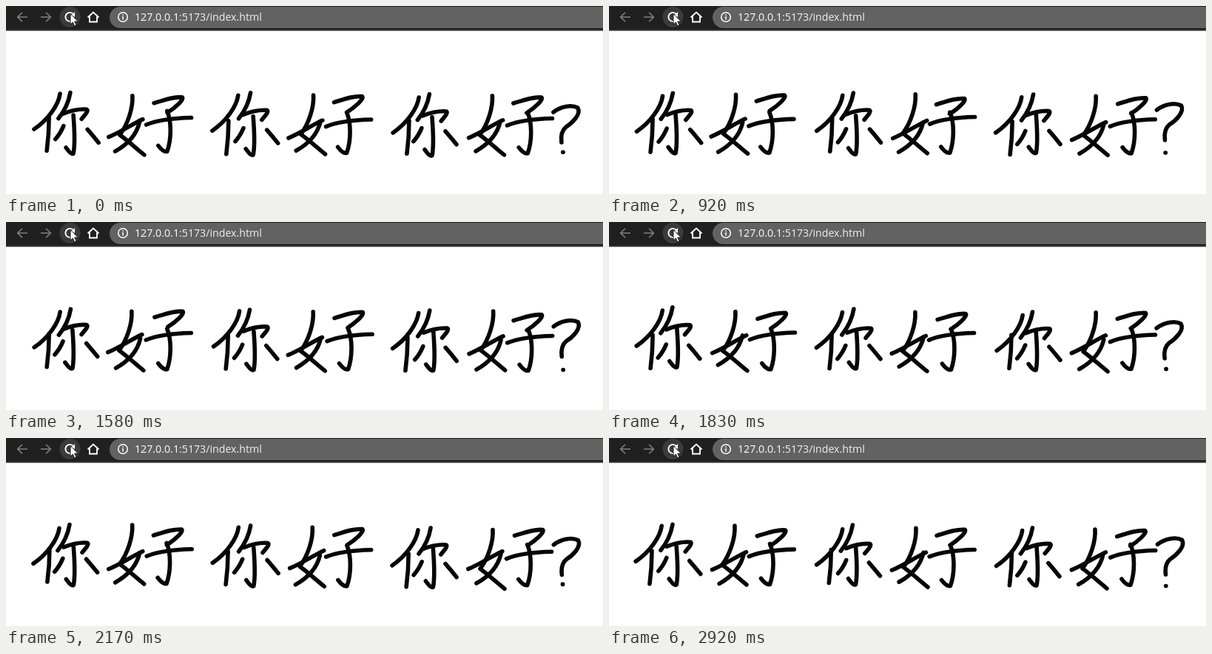
Animation, 807 px wide and 255 px high, one loop 3.08 s. Source, as an HTML page:

```html
<!DOCTYPE html>
<html lang="zh">
<head>
<meta charset="utf-8">
<title>你好</title>
<style>
  html, body { margin: 0; width: 100%; height: 100%; overflow: hidden; background: #fff; }
  svg { display: block; width: 807px; height: 255px; }
  .icon { fill: none; stroke: #fff; stroke-width: 1.9; }
  .dim { stroke: #808080; stroke-width: 1.6; }
  .thin { stroke-width: 1.5; }
  .ink { fill: none; stroke: #060606; stroke-width: 5.6; stroke-linecap: round; stroke-linejoin: round; }
  text { font: 14.2px "Open Sans", "Noto Sans", sans-serif; fill: #fff; }
</style>
</head>
<body>
<svg viewBox="0 0 807 255">
  <rect width="807" height="33.5" fill="#202020"/>
  <rect y="32.5" width="807" height="1" fill="#555"/>
  <path d="M807 1H154.5a14.5 14.5 0 0 0 0 29H807z" fill="#626262"/>
  <circle cx="86.5" cy="15" r="14" fill="#3b3b3b"/>
  <path class="icon dim" d="M29 15H16M22 8.7L15.7 15L22 21.3"/>
  <path class="icon dim" d="M47 15H60M54 8.7L60.3 15L54 21.3"/>
  <path class="icon" d="M91 11A6 6 0 1 0 92 17"/>
  <path d="M93 8V14.5H86.5z" fill="#fff"/>
  <path class="icon" d="M110.5 15.5L118 8.5L125.5 15.5M113 14V21.5H123V14"/>
  <circle class="icon thin" cx="158" cy="15" r="6.3"/>
  <path class="icon thin" d="M158 14V18.5M158 11.2V12.8"/>
  <text x="174" y="20">127.0.0.1<tspan fill="#f0f0f0">:5173/index.html</tspan></text>
  <path d="M87 10.5V25L90.3 21.9L92.6 27L95 26L92.7 21H97.4z" fill="#fff" stroke="#111" stroke-width=".9"/>
  <g class="ink" id="ink"></g>
</svg>
<script>
const LOOP = 3080;
const TICK = 1000 / 12;

// One path per pen stroke
const ni = [
  'M72 121C70 136 56 156 37 169',
  'M58 152C58 168 57 182 55 197',
  'M87 117C85 129 79 142 71 152',
  'M78 147C88 143 99 140 110 141C113 143 107 149 103 154',
  'M91 146C92 162 94 182 91 198C88 200 84 194 81 190',
  'M77 164Q73 174 66 182',
  'M109 166Q116 174 124 184'
];
const hao = [
  'M171 120C172 136 165 158 154 173C164 180 177 192 187 200',
  'M139 177C154 171 170 160 185 153',
  'M181 156C177 174 164 187 148 196',
  'M200 131C213 127 226 122 238 123C241 126 229 137 218 144',
  'M218 144C224 158 224 182 218 199C214 200 209 195 206 191',
  'M190 161C207 154 230 152 251 151.5'
];
const ask = ['M741 143C750 136 765 132 774 137C779 146 766 158 758 163C752 168 751 176 752 184', 'M753 200h.2'];

// Ticks at which the writing takes a new pose
const poses = [0, 10, 11, 12, 13, 15, 19, 20, 22, 23, 24, 25, 26, 28, 29, 30, 31];

const ink = document.getElementById('ink');
const strokes = [];
function write(glyph, x, y) {
  for (const d of glyph) {
    const path = document.createElementNS('http://www.w3.org/2000/svg', 'path');
    path.setAttribute('d', d);
    ink.appendChild(path);
    strokes.push({ path, x, y });
  }
}

for (let word = 0; word < 3; word++) {
  write(ni, word * 243, word * 1.7);
  write(hao, word * 243.5, word * 1.2);
}
write(ask, 0, 0);

// Seeded noise from -1 to 1
function noise(seed) {
  const n = Math.sin(seed * 12.9898) * 43758.5453;
  return (n - Math.floor(n)) * 2 - 1;
}

function pose(tick) {
  strokes.forEach(({ path, x, y }, i) => {
    const seed = tick * 100 + i * 2 + 1;
    const dx = x + noise(seed) * 1.2;
    const dy = y + noise(seed + 1) * 2.2;
    path.setAttribute('transform', `translate(${dx} ${dy})`);
  });
}

let shown = -1;
const begin = performance.now();
function frame() {
  const t = (performance.now() - begin) % LOOP;
  const tick = poses.findLast(p => p * TICK <= t + 4);
  if (tick !== shown) pose(shown = tick);
  requestAnimationFrame(frame);
}
frame();
</script>
</body>
</html>
```
